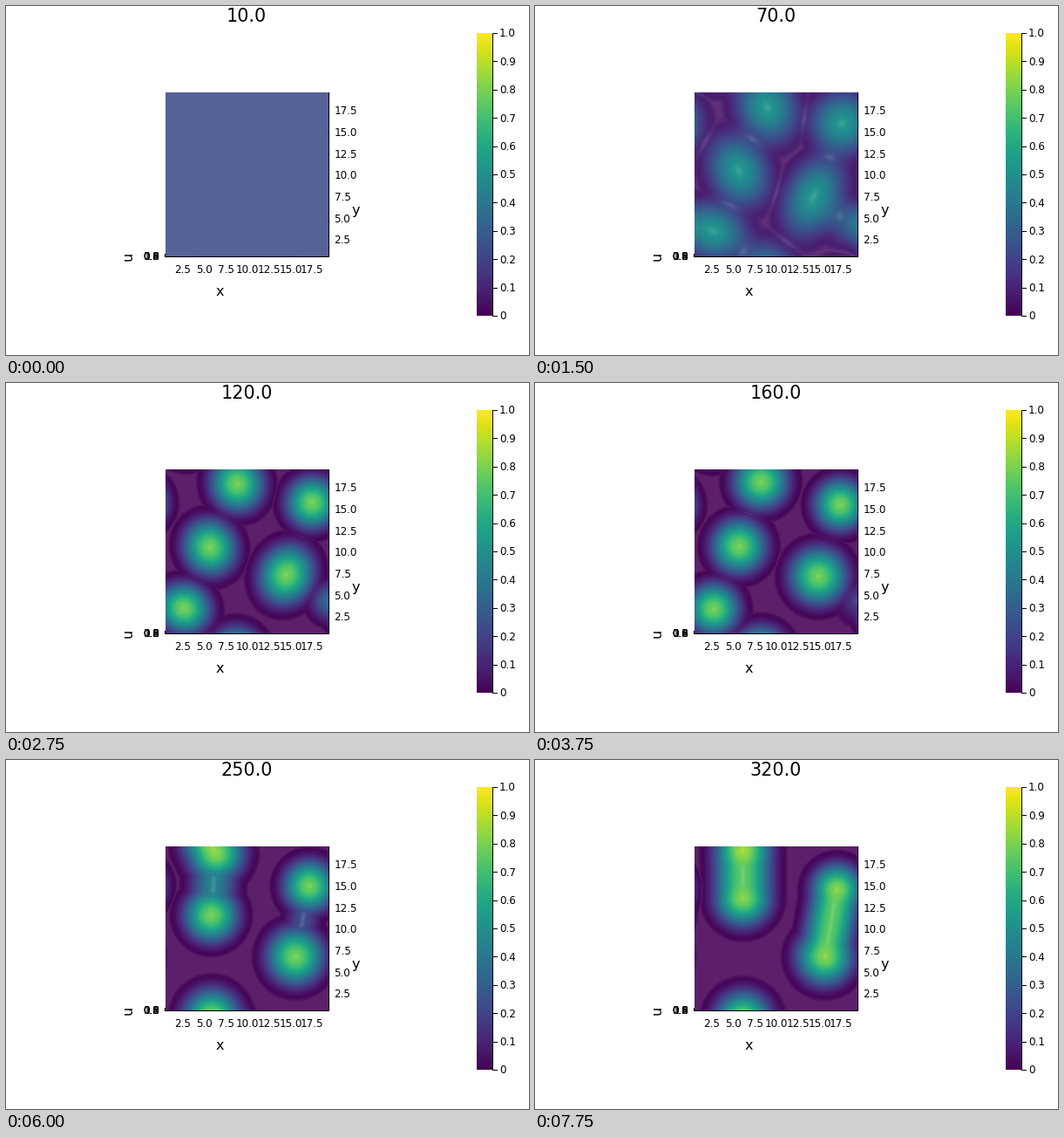
Recreate the animation shown at these times as a matplotlib script. Size 600x400 px, loop 8000 ms.

```python
import numpy as np
import matplotlib.pyplot as plt
from matplotlib.animation import FuncAnimation
from matplotlib.patches import Rectangle

W, H, DPI = 600, 400, 100
FRAMES, INTERVAL = 32, 250
LEFT, RIGHT, TOP, BOTTOM = 183, 370, 99, 288
SCALE = 9.88          # pixels per unit
PERIOD = 20           # the field repeats at its edges
PEAK = 0.78
viridis = plt.get_cmap("viridis")

px = np.arange(LEFT, RIGHT) + 0.5
py = np.arange(TOP, BOTTOM) + 0.5
X, Y = np.meshgrid(0.47 + (px - LEFT) / SCALE, 0.47 + (BOTTOM - py) / SCALE)


def ramp(i, start, end):
    return min(1, max(0, (i - start) / (end - start)))


def ease(i, start, end):
    t = ramp(i, start, end)
    return t * t * (3 - 2 * t)


def condensed(i):
    """How far the soft early bumps have tightened into clumps."""
    return ease(i, 4, 10)


def radius(i):
    return 6.9 - 1.5 * condensed(i)


def wrap(d):
    return (d + PERIOD / 2) % PERIOD - PERIOD / 2


def dome(s2):
    return np.clip(1 - s2, 0, None) ** 2.6


class Blob:
    """Clump that drifts from start to end and rounds off on the way."""

    def __init__(self, start, end, move, size=1, stretch=0, angle=0,
                 fade=lambda i: 1):
        self.start, self.end = np.array(start), np.array(end)
        self.move, self.size, self.fade = move, size, fade
        self.stretch, self.angle = stretch, np.radians(angle)

    def centre(self, i):
        return self.start + (self.end - self.start) * self.move(i)

    def field(self, i):
        x, y = self.centre(i)
        dx, dy = wrap(X - x), wrap(Y - y)
        c, s = np.cos(self.angle), np.sin(self.angle)
        e = self.stretch * (1 - ease(i, 6, 14))
        r = radius(i) * self.size
        amp = (0.36 + (PEAK - 0.36) * condensed(i)) * self.fade(i)
        return amp * dome(((dx * c + dy * s) / (r * (1 + e))) ** 2
                          + ((dy * c - dx * s) / (r * (1 - e))) ** 2)


class Neck:
    """Bridge that thickens between two clumps."""

    def __init__(self, a, b, begin, done, size=1):
        self.a, self.b, self.size = a, b, size
        self.begin, self.done = begin, done

    def field(self, i):
        level = ramp(i, self.begin, self.done) ** 1.5
        start = self.a.centre(i)
        v = wrap(self.b.centre(i) - start)
        mid = start + v / 2
        qx, qy = wrap(X - mid[0]), wrap(Y - mid[1])
        t = np.clip((qx * v[0] + qy * v[1]) / (v @ v), -0.5, 0.5)
        d2 = (qx - t * v[0]) ** 2 + (qy - t * v[1]) ** 2
        r = radius(i) * self.size * (0.5 + 0.5 * level)
        return (PEAK - 0.03) * level * dome(d2 / r ** 2)


middle = Blob((5.6, 10.5), (6.1, 13.6), lambda i: (i / 31) ** 4,
              0.95, 0.12, 115)
upper = Blob((8.9, 17.9), (6.1, 18.9), lambda i: ease(i, 9, 27),
             0.95, 0.1, 110)
right = Blob((17.6, 16), (17, 14.6), lambda i: ramp(i, 6, 31), 0.9)
lower = Blob((14.3, 7.5), (15.6, 6.8), lambda i: ease(i, 6, 26),
             1, 0.2, 65)
corner = Blob((2.6, 3.5), (6.1, -0.5), lambda i: ease(i, 14, 26),
              0.9, 0.12, -20)
edge = Blob((17.8, 4.7), (19.6, 4.3), lambda i: ramp(i, 5, 9), 0.65,
            fade=lambda i: 0.45 * (1 - ease(i, 10, 20)))
parts = [middle, upper, right, lower, corner, edge,
         Neck(middle, upper, 10, 30),
         Neck(corner, upper, 13, 24),
         Neck(lower, right, 18, 31, 0.85)]


def surface(i):
    c = condensed(i)
    power = 1 + 11 * c ** 3      # from plain sum to near maximum
    u = sum(p.field(i) ** power for p in parts) ** (1 / power)
    u += 0.07 * (1 - c)
    calm = 0.24 - 0.008 * ((X - 10) ** 4 + (Y - 10) ** 4) / 1e4
    grow = min(1, np.expm1(i / 2) / np.expm1(3))
    return calm + (u - calm) * grow


def shade(u):
    """Colour map with a white sheen wherever the surface is flat."""
    gy, gx = np.gradient(u, 1 / SCALE)
    sheen = 0.125 * np.exp(-(gx ** 2 + gy ** 2) / 0.032 ** 2)
    rgb = viridis(np.clip(u, 0, 1))[..., :3]
    return rgb + (1 - rgb) * sheen[..., None]


plt.rcParams["font.family"] = "DejaVu Sans"
fig = plt.figure(figsize=(W / DPI, H / DPI), dpi=DPI, facecolor="white")
ax = fig.add_axes([0, 0, 1, 1])
ax.axis("off")


def label(x, y, text, size=12, ha="center", va="baseline", **kw):
    return ax.text(x, y, text, fontsize=size * 72 / DPI, ha=ha, va=va,
                   color="black", **kw)


def bar(x, y, w, h):
    ax.add_patch(Rectangle((x, y), w, h, fc="black", lw=0, zorder=3))


picture = ax.imshow(shade(surface(0)), extent=(LEFT, RIGHT, BOTTOM, TOP),
                    interpolation="nearest", aspect="auto")
ax.imshow(np.linspace(1, 0, 256)[:, None], cmap=viridis,
          extent=(540, 558, 355, 31), interpolation="nearest", aspect="auto")
ax.set(xlim=(0, W), ylim=(H, 0))

bar(RIGHT, TOP, 1, BOTTOM - TOP)
bar(LEFT, BOTTOM - 1, RIGHT - LEFT, 1)
bar(LEFT - 1, BOTTOM - 4, 1, 4)
for k in range(1, 8):
    v = 2.5 * k
    label(203 + (v - 2.5) * SCALE, 305.6, f"{v:.1f}")
    label(376.5, 272.3 - (v - 2.5) * SCALE, f"{v:.1f}", ha="left")
for k in range(6):
    label(176.5, 291.2, f"{k / 5:.1f}", ha="right")
label(245.5, 331.5, "x", 16)
label(401, 238.6, "y", 16)
label(140, 286.5, "u", 16, va="center", rotation=90)

bar(558, 31, 1, 325)
for k in range(11):
    y = 355 - 32.4 * k
    bar(558, round(y) - 0.5, 6, 1)
    label(566, y + 4.4, f"{k / 10:.1f}" if k else "0", ha="left")
title = label(276, 18.5, "10.0", 20.8)


def update(i):
    picture.set_data(shade(surface(i)))
    title.set_text(f"{10 * (i + 1):.1f}")
    return picture, title


anim = FuncAnimation(fig, update, frames=FRAMES, interval=INTERVAL,
                     repeat=True, repeat_delay=0)
plt.show()
```
